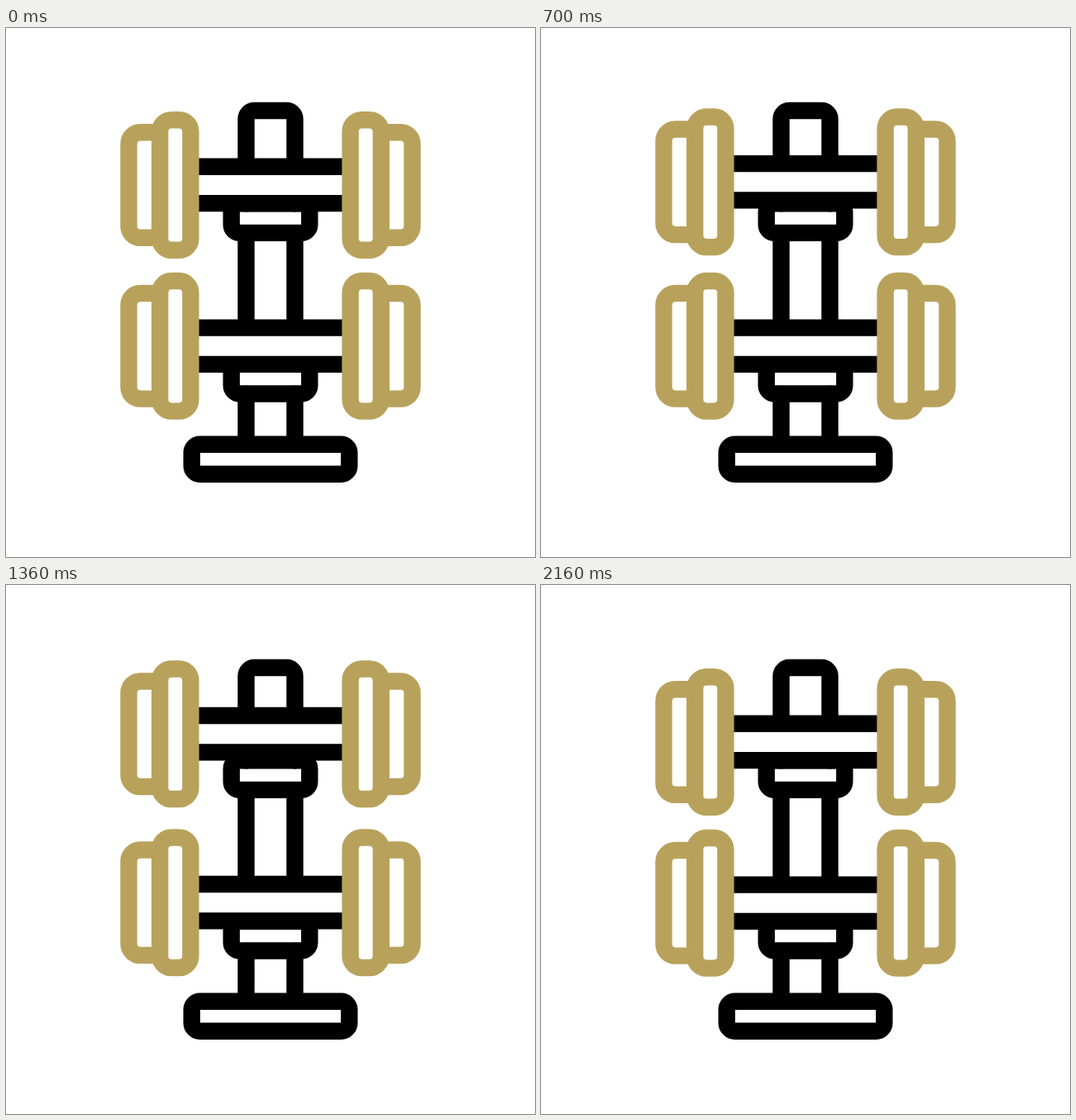
An HTML page that plays this animation: 640x640 px, repeating every 2.4 s.

```html
<!DOCTYPE html>
<html lang="en">
<head>
<meta charset="utf-8">
<title>Dumbbell rack</title>
<style>
  html, body { margin: 0; height: 100%; overflow: hidden; background: #fff; }
  svg { display: block; width: 100vw; height: 100vh; }
</style>
</head>
<body>
<svg viewBox="0 0 640 640" fill="none" stroke="#000" stroke-width="20.4">
  <defs>
    <g id="plates" stroke="#b8a25b">
      <path d="M187 126.2H162.5a14 14 0 0 0-14 14V239.8a14 14 0 0 0 14 14H187"/>
      <rect x="186.2" y="111.2" width="37.2" height="157.6" rx="14"/>
    </g>
    <g id="dumbbell">
      <path fill="#fff" stroke="none" d="M223 168H417V212H223z"/>
      <path d="M223 167.8H417M223 212.1H417"/>
      <use href="#plates"/>
      <use href="#plates" transform="matrix(-1 0 0 1 640 0)"/>
    </g>
    <rect id="bracket" fill="#fff" x="272.7" y="212.2" width="94.6" height="35.7" rx="10"/>
  </defs>
  <path d="M290.5 248V407M349.5 248V407"/>
  <use href="#bracket"/>
  <use href="#bracket" y="194.6"/>
  <rect x="224.7" y="503.8" width="190.6" height="36" rx="10"/>
  <path stroke-linecap="round" d="M290.5 212.2V110a10 10 0 0 1 10-10H339.5a10 10 0 0 1 10 10V212.2M290.5 442.6V503.6M349.5 442.6V503.6"/>
  <use id="upper" href="#dumbbell"/>
  <use id="lower" href="#dumbbell"/>
</svg>
<script>
const LOOP = 2400, STEP = 20, HALF = 348, LIFT = 75.5;
const upper = document.getElementById('upper');
const lower = document.getElementById('lower');

// cubic-bezier(.7, 0, .3, 1), solved by bisection
function ease(x) {
  let lo = 0, hi = 1, u;
  for (let i = 0; i < 24; i++) {
    u = (lo + hi) / 2;
    const v = 1 - u;
    if (2.1 * u * v * v + 0.9 * u * u * v + u ** 3 < x) lo = u; else hi = u;
  }
  return u * u * (3 - 2 * u);
}

// Three lifts, each rising and falling for HALF ms
function lift(t, start) {
  const phase = (t - start) / HALF;
  if (t < 60 || t >= 2160 || phase <= 0 || phase >= 6) return 0;
  const p = phase % 2;
  return -LIFT * ease(p < 1 ? p : 2 - p);
}

function draw() {
  const t = Math.floor(performance.now() % LOOP / STEP) * STEP;
  upper.setAttribute('y', lift(t, 83));
  lower.setAttribute('y', 194.8 + lift(t, 2));
  requestAnimationFrame(draw);
}
draw();
</script>
</body>
</html>
```
